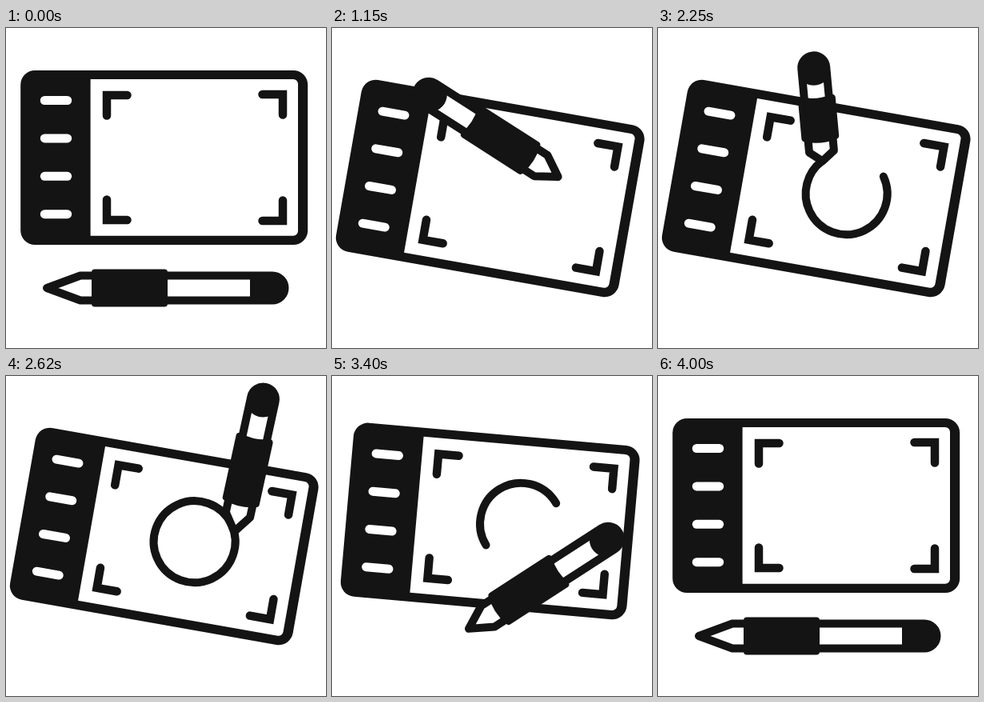
An HTML page with a canvas that plays this animation: 400x400 px, repeating every 4020 ms.

```html
<!DOCTYPE html>
<html lang="en">
<head>
<meta charset="utf-8">
<title>Drawing tablet</title>
<style>
  html, body { margin: 0; height: 100%; overflow: hidden; background: #fff; }
  canvas { display: block; width: 400px; height: 400px; }
</style>
</head>
<body>
<canvas id="stage" width="400" height="400"></canvas>
<script>
const LOOP = 4020, INK = '#141414', RAD = Math.PI / 180;
const CENTER = { x: 197.7, y: 162 }, TILT = 10, DROP = 38.5;
const RING = { x: 38.5, y: 0, r: 51, start: -35, sweep: 395 };
// Pen timing: leave the rest pose, touch the ring, lift off, lie down again
const LEAVE = 490, TOUCH = 1180, LIFT = 3100, LIE = 4000;
const REST = { x: 51, y: 325 }, FULL = 282, SHORT = 192, SHORTEST = 117;
const ANGLE_TOUCH = -148, ANGLE_LIFT = -74;
const ctx = document.getElementById('stage').getContext('2d');

const span = (t, a, b) => Math.max(0, Math.min(1, (t - a) / (b - a)));
const mix = (a, b, u) => a + (b - a) * u;
const sine = u => (1 - Math.cos(Math.PI * u)) / 2;
const cubic = u => u < 0.5 ? 4 * u ** 3 : 1 - 4 * (1 - u) ** 3;
const bend = (a, c, b, u) => mix(mix(a, c, u), mix(c, b, u), u);

const tilt = t => sine(span(t, 490, 1010)) - sine(span(t, 3110, 3695));
const progress = t => cubic(span(t, TOUCH, LIFT));

function line(width, ...points) {
  ctx.lineWidth = width;
  ctx.beginPath();
  points.forEach(([x, y]) => ctx.lineTo(x, y));
  ctx.stroke();
}

function box(color, x, y, w, h, radii) {
  ctx.fillStyle = color;
  ctx.beginPath();
  ctx.roundRect(x, y, w, h, radii);
  ctx.fill();
}

function bracket(x, y, sx, sy) {
  line(10.5, [x, y + 25.5 * sy], [x, y], [x + 25.5 * sx, y]);
}

function ring(t) {
  const end = Math.min(359.9, RING.sweep * progress(t));
  const begin = 359.9 * sine(span(t, 3100, 3705));
  if (end - begin < 0.1) return;
  ctx.lineWidth = 10;
  ctx.beginPath();
  ctx.arc(RING.x, RING.y, RING.r, (RING.start + begin) * RAD, (RING.start + end) * RAD);
  ctx.stroke();
}

function tablet(t) {
  const p = tilt(t);
  ctx.save();
  ctx.translate(CENTER.x, CENTER.y + DROP * p);
  ctx.rotate(TILT * p * RAD);
  ctx.lineJoin = 'miter';

  ctx.save();
  ctx.translate(-CENTER.x, -CENTER.y);
  box(INK, 18.2, 53, 359, 218, 18);
  box('#fff', 105.6, 64, 259.4, 195.7, [0, 6, 6, 0]);
  bracket(126, 84, 1, 1);
  bracket(346, 83, -1, 1);
  bracket(126, 240, 1, -1);
  bracket(346, 241, -1, -1);
  ctx.strokeStyle = '#fff';
  for (let i = 0; i < 4; i++) line(11, [48.3, 90.5 + 47.4 * i], [76.7, 90.5 + 47.4 * i]);
  ctx.restore();

  ring(t);
  ctx.restore();
}

// Point on the ring while the tablet is fully tilted
function onRing(p) {
  const a = (RING.start + RING.sweep * p + TILT) * RAD;
  return { x: 236 + RING.r * Math.cos(a), y: 207.3 + RING.r * Math.sin(a) };
}

function penPose(t) {
  if (t < TOUCH) {
    const s = sine(span(t, LEAVE, TOUCH)), to = onRing(0);
    return {
      x: bend(REST.x, 327, to.x, s),
      y: bend(REST.y, 208, to.y, s),
      angle: ANGLE_TOUCH * s,
      length: mix(SHORT, FULL, (1 - s) ** 4)
    };
  }
  if (t < LIFT) {
    const p = progress(t), q = p ** 0.8;
    return {
      ...onRing(p),
      angle: mix(ANGLE_TOUCH, ANGLE_LIFT, q),
      length: mix(SHORT, SHORTEST, Math.sin(Math.PI * q * q))
    };
  }
  const s = sine(span(t, LIFT, LIE) ** 0.57), from = onRing(1);
  return {
    x: bend(from.x, 200, REST.x, s),
    y: bend(from.y, 350, REST.y, s),
    angle: ANGLE_LIFT * (1 - s),
    length: mix(SHORT, FULL, s ** 3)
  };
}

function pen(t) {
  const { x, y, angle, length } = penPose(t);
  // Foreshortening: 0 when seen end-on the most, 1 when lying flat
  const flat = span(length, SHORTEST, FULL);
  const body = mix(26, 56, flat);
  const barrel = body + mix(95, 56, (1 - flat) ** 4);
  const cap = length - mix(22, 28, flat * flat);
  const bulge = Math.min(6, (FULL - length) / 12);
  const shoulder = body - 14, half = 15.5;

  ctx.save();
  ctx.translate(x, y);
  ctx.rotate(angle * RAD);
  ctx.lineJoin = 'round';

  ctx.beginPath();
  ctx.moveTo(0, 0);
  ctx.lineTo(shoulder, -half);
  ctx.arc(length, 0, half, -Math.PI / 2, Math.PI / 2);
  ctx.lineTo(shoulder, half);
  ctx.closePath();
  ctx.fillStyle = '#fff';
  ctx.fill();
  ctx.lineWidth = 10;
  ctx.stroke();

  ctx.fillStyle = INK;
  ctx.beginPath();
  ctx.moveTo(cap + bulge, -half);
  ctx.arc(length, 0, half, -Math.PI / 2, Math.PI / 2);
  ctx.lineTo(cap + bulge, half);
  ctx.quadraticCurveTo(cap - bulge, 0, cap + bulge, -half);
  ctx.fill();

  const a = body + 4, b = barrel - 4, side = 19.5;
  ctx.beginPath();
  ctx.moveTo(a, -side);
  ctx.lineTo(b, -side);
  ctx.quadraticCurveTo(b - bulge, 0, b, side);
  ctx.lineTo(a, side);
  ctx.quadraticCurveTo(a - bulge, 0, a, -side);
  ctx.closePath();
  ctx.fill();
  ctx.lineWidth = 8;
  ctx.stroke();
  ctx.restore();
}

function frame() {
  const t = performance.now() % LOOP;
  ctx.fillStyle = '#fff';
  ctx.fillRect(0, 0, 400, 400);
  ctx.strokeStyle = INK;
  ctx.lineCap = 'round';
  tablet(t);
  pen(t);
  requestAnimationFrame(frame);
}
frame();
</script>
</body>
</html>
```
